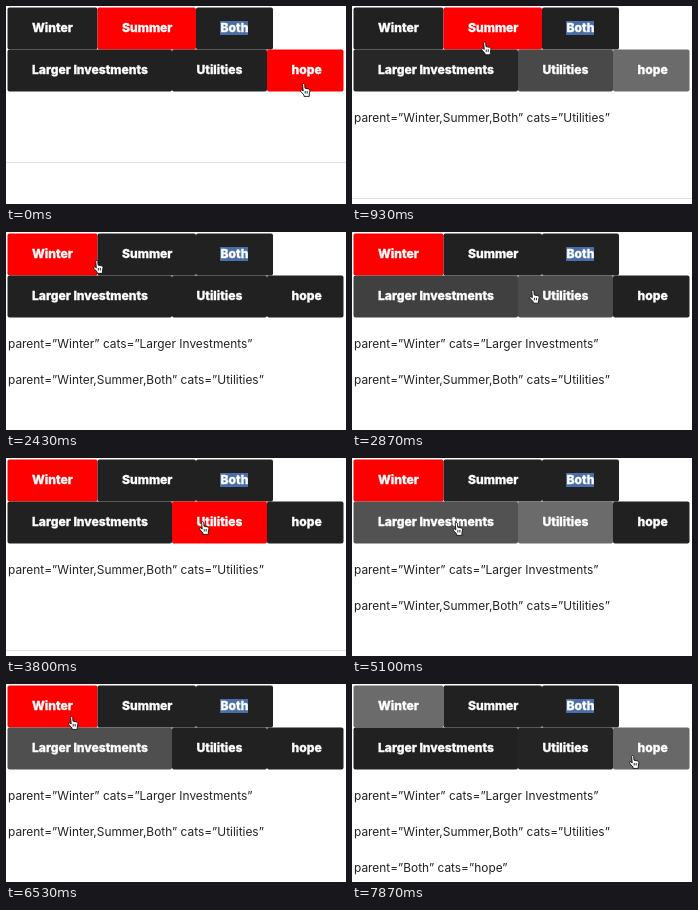
Write an HTML page that moves like this. It is 340x198 px and loops after 8000 ms.

```html
<!DOCTYPE html>
<html lang="en">
<head>
<meta charset="utf-8">
<style>
  html, body { margin: 0; width: 100%; height: 100%; overflow: hidden; background: #fff; }
  svg { display: block; }
  text { font-family: Inter, sans-serif; white-space: pre; }
  .label { font-size: 12.1px; font-weight: 800; fill: #fff; stroke: #fff; stroke-width: 0.3px; }
  .result { font-size: 11.9px; fill: #222; }
</style>
</head>
<body>
<svg id="stage" width="340" height="198" viewBox="0 0 340 198"></svg>
<script>
const LOOP = 8000, FADE = 200, SAMPLES = 24, PRESS = 90, ROW = 42;
const DARK = [33, 33, 33], GREY = [107, 107, 107], RED = [255, 0, 0];
const stage = document.getElementById('stage');

function add(tag, attrs, text = '') {
  const el = document.createElementNS('http://www.w3.org/2000/svg', tag);
  for (const key in attrs) el.setAttribute(key, attrs[key]);
  el.textContent = text;
  return stage.appendChild(el);
}

const buttons = [];
[
  { Winter: 90, Summer: 98.5, Both: 77 },
  { 'Larger Investments': 164.5, Utilities: 95, hope: 76.5 }
].forEach((widths, row) => {
  let x = 1.5;
  const y = 1.5 + ROW * row;
  for (const [name, width] of Object.entries(widths)) {
    const rect = add('rect', { x, y, width, height: ROW, rx: 2 });
    if (name === 'Both') add('rect', { x: x + 24, y: 15, width: 28, height: 14, fill: '#4a6fa8' });
    add('text', { x: x + 24.5, y: y + 24.7, class: 'label' }, name);
    buttons.push({ name, row, x, y, width, rect });
    x += width;
  }
});

const items = [
  ['Winter', 'Larger Investments'], ['Winter,Summer,Both', 'Utilities'], ['Both', 'hope']
].map(([parent, cats]) => ({
  parent, cats,
  el: add('text', { x: 2, class: 'result' }, `parent=”${parent}” cats=”${cats}”`)
}));
const rule = add('rect', { x: 0, width: 340, height: 1, fill: '#e2e2e2' });
const hand = add('path', {
  d: 'M2.6 1.5C2.6.2 4.6.2 4.7 1.5L5 5.2l3.4.7c1.1.3 1.6 1 1.5 2L9.3 11v2.4H4V12L.8 8.5C0 7.3 1.3 6.4 2.2 7.2L3.2 8zM5.2 8v2.5M7.2 8v2.5',
  fill: '#fff', stroke: '#111', 'stroke-width': 0.9, 'stroke-linejoin': 'round'
});

const clicks = [
  [560, 'hope'], [1230, 'Winter'], [3560, 'Utilities'], [4860, 'Utilities'],
  [5350, 'Larger Investments'], [5960, 'Larger Investments'], [6580, 'Winter']
];

// start, end, x and y reached
const moves = [
  [580, 1150, 48, 15], [2100, 3070, 193, 63], [4930, 5110, 100, 64],
  [6010, 6460, 62, 32], [7430, 7740, 277, 71]
];

// A press takes the focus; its release toggles the choice within the row.
function stateAt(t) {
  const chosen = ['Summer', 'hope'];
  let focus = 'hope';
  for (const [time, name] of clicks) {
    if (t >= time - PRESS) focus = name;
    if (t < time) continue;
    const { row } = buttons.find(b => b.name === name);
    chosen[row] = chosen[row] === name ? '' : name;
  }
  return { chosen, focus };
}

function pointerAt(t) {
  let x = 294, y = 77;
  for (const [start, end, toX, toY] of moves) {
    const u = Math.min(1, Math.max(0, (t - start) / (end - start)));
    const eased = u * u * (3 - 2 * u);
    x += (toX - x) * eased;
    y += (toY - y) * eased;
  }
  return [x, y];
}

function targetColour(b, t) {
  const { chosen, focus } = stateAt(t);
  if (chosen.includes(b.name)) return RED;
  const [px, py] = pointerAt(t), dx = px + 3 - b.x, dy = py + 1 - b.y;
  const hover = dx >= 0 && dx < b.width && dy >= 0 && dy < ROW;
  return hover || b.name === focus ? GREY : DARK;
}

// Averaging over recent targets gives an eased colour fade.
function fadedColour(b, t) {
  const sum = [0, 0, 0];
  for (let i = 0; i < SAMPLES; i++) {
    const lag = FADE * ((i + 0.5) / SAMPLES) ** 1.6;
    targetColour(b, Math.max(0, t - lag)).forEach((v, c) => sum[c] += v / SAMPLES);
  }
  return `rgb(${sum.map(Math.round)})`;
}

function draw(t) {
  for (const b of buttons) b.rect.setAttribute('fill', fadedColour(b, t));
  const [parent, cat] = stateAt(t).chosen;
  let line = 0;
  for (const item of items) {
    const shown = (!parent || item.parent.includes(parent)) && (!cat || item.cats === cat);
    item.el.setAttribute('visibility', shown ? 'visible' : 'hidden');
    if (shown) item.el.setAttribute('y', 116 + 36 * line++);
  }
  rule.setAttribute('y', 156 + 36 * line);
  hand.setAttribute('transform', `translate(${pointerAt(t)})`);
}

const start = performance.now();
function tick() {
  draw((performance.now() - start) % LOOP);
  requestAnimationFrame(tick);
}
tick();
</script>
</body>
</html>
```
